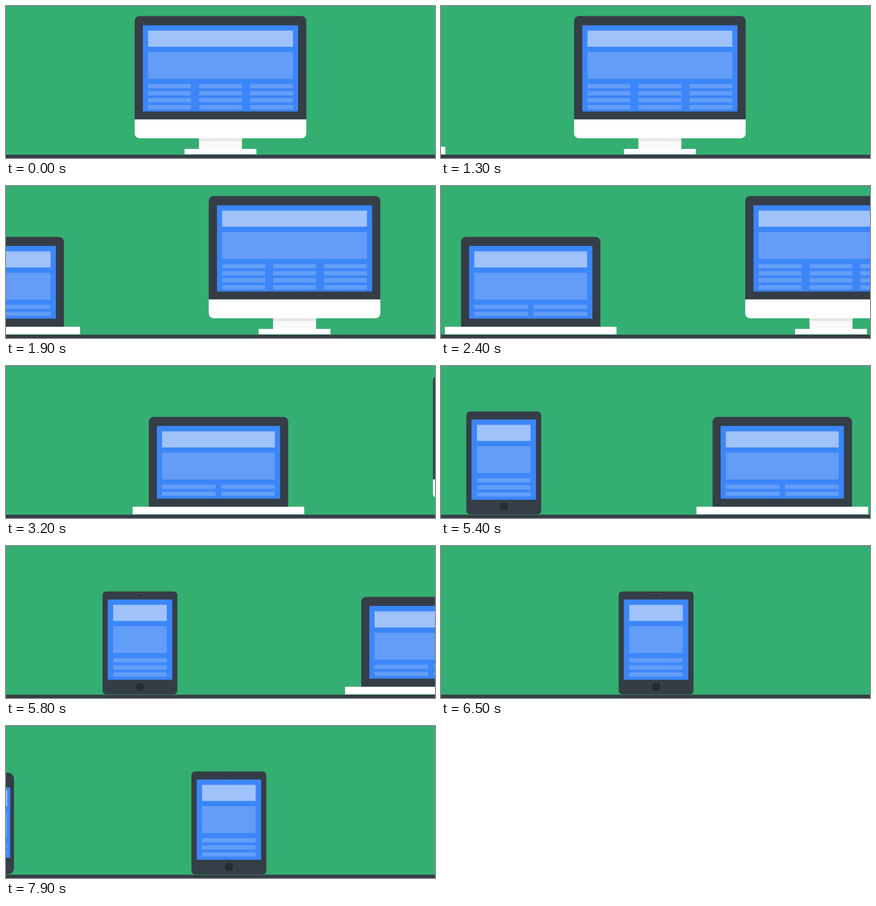
An HTML page with a canvas for the animation above (8 s loop, 705 by 250 pixels).

```html
<!DOCTYPE html>
<html lang="en">
<head>
<meta charset="utf-8">
<title>Responsive devices</title>
<style>
  html, body { margin: 0; width: 100%; height: 100%; overflow: hidden; background: #34af71; }
  canvas { display: block; }
</style>
</head>
<body>
<canvas id="stage" width="705" height="250"></canvas>
<script>
const ctx = document.getElementById('stage').getContext('2d');
const W = 705, H = 250, MID = W / 2;
const LOOP = 8000, STEP = 100, SLIDE = 2650;

const color = {
  back: '#34af71', dark: '#353d46', edge: '#2b323a', button: '#252b30',
  screen: '#3b86f9', header: '#9fc2fb', panel: '#649df7',
  white: '#ffffff', stand: '#fafafa', shade: '#e6e6e6'
};

// Boxes are given by left and right relative to the device centre.
function box(left, top, right, bottom, fill, radii = 0) {
  ctx.fillStyle = fill;
  ctx.beginPath();
  ctx.roundRect(left, top, right - left, bottom - top, radii);
  ctx.fill();
}

function centred(half, top, bottom, fill, radii) {
  box(-half, top, half, bottom, fill, radii);
}

function dot(y, r) {
  ctx.fillStyle = color.button;
  ctx.beginPath();
  ctx.arc(0, y, r, 0, Math.PI * 2);
  ctx.fill();
}

function page(half, top, columns, rows, gap) {
  centred(half, top, top + 26.5, color.header);
  centred(half, top + 35.3, top + 79.3, color.panel);
  const width = (half * 2 - gap * (columns - 1)) / columns;
  for (let c = 0; c < columns; c++) {
    const left = -half + c * (width + gap);
    for (let r = 0; r < rows; r++) {
      const y = top + 87.8 + r * 11.6;
      box(left, y, left + width, y + 7, color.panel);
    }
  }
}

const desktop = {
  half: 141,
  draw() {
    centred(35.3, 217, 236, color.stand);
    centred(35.3, 217, 222, color.shade);
    centred(59, 235, 244, color.white);
    centred(141, 16.5, 186.5, color.dark, [8, 8, 0, 0]);
    centred(141, 185.3, 186.5, color.edge);
    centred(141, 186.5, 217.5, color.white, [0, 0, 8, 8]);
    centred(127.5, 31.8, 173.5, color.screen);
    page(119, 40.5, 3, 4, 13.3);
  }
};

const laptop = {
  half: 141,
  draw() {
    centred(114.5, 83.7, 231.5, color.dark, [8, 8, 0, 0]);
    centred(114.5, 230.5, 231.5, color.edge);
    centred(141, 231.5, 244, color.white);
    centred(101.3, 98.5, 218.3, color.screen);
    page(92.7, 107.4, 2, 2, 9);
  }
};

const tablet = {
  half: 61.5,
  draw() {
    centred(61.5, 74.8, 244, color.dark, 6);
    centred(53, 88, 220, color.screen);
    page(44, 96.8, 1, 3, 0);
    dot(81.7, 1.8);
    dot(231.5, 6.8);
  }
};

const phone = {
  half: 40.5,
  draw() {
    centred(40.5, 76.7, 244, color.dark, 10);
    centred(34.5, 101, 217, color.screen);
    page(29.5, 105.5, 1, 2, 0);
  }
};

// Each slide pushes one device out to the right while the next comes in.
const slides = [
  { start: 1035, out: desktop, into: laptop, lag: 0, gap: 0 },
  { start: 4265, out: laptop, into: tablet, lag: 25, gap: 5 },
  { start: 7540, out: tablet, into: phone, lag: 0, gap: 0 }
];

const bezier = (s, a, b) =>
  3 * s * (1 - s) ** 2 * a + 3 * s * s * (1 - s) * b + s ** 3;

// Slight anticipation at the start and an overshoot at the end.
function ease(x) {
  if (x <= 0) return 0;
  if (x >= 1) return 1;
  let low = 0, high = 1;
  for (let i = 0; i < 30; i++) {
    const s = (low + high) / 2;
    if (bezier(s, 0.4, 0.6) < x) low = s; else high = s;
  }
  return bezier(low, -0.05, 1.2);
}

function place(device, x) {
  ctx.save();
  ctx.translate(x, 0);
  device.draw();
  ctx.restore();
}

function render(t) {
  ctx.fillStyle = color.back;
  ctx.fillRect(0, 0, W, H);
  const slide = slides.findLast(s => t >= s.start);
  if (!slide) {
    place(desktop, MID);
  } else {
    const { start, out, into, lag, gap } = slide;
    const leaving = ease((t - start) / SLIDE);
    const entering = ease((t - start - lag) / SLIDE);
    const from = -into.half - gap;
    place(out, MID + (MID + out.half) * leaving);
    place(into, from + (MID - from) * entering);
  }
  ctx.fillStyle = color.dark;
  ctx.fillRect(0, 244.6, W, H - 244.6);
}

let origin;
function tick(now) {
  origin ??= now;
  const t = (now - origin) % LOOP;
  render(Math.floor(t / STEP) * STEP);
  requestAnimationFrame(tick);
}
render(0);
requestAnimationFrame(tick);
</script>
</body>
</html>
```
